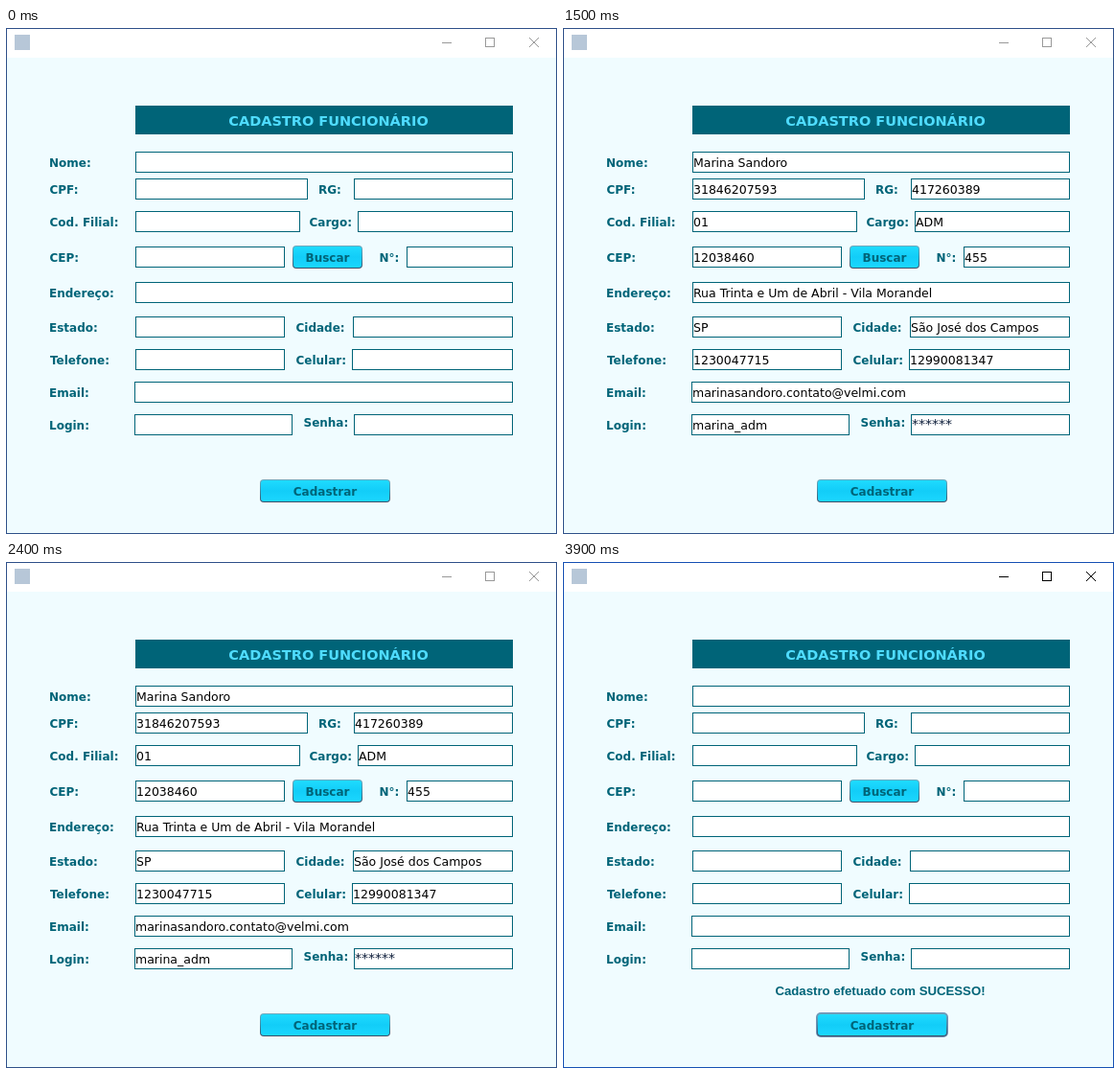
Write an HTML page with a canvas that moves like this. It is 575 px wide and 528 px high and loops after 4.5 s.

```html
<!DOCTYPE html>
<html lang="pt-BR">
<head>
<meta charset="utf-8">
<title>Cadastro</title>
<style>
  html, body { margin: 0; width: 100%; height: 100%; overflow: hidden; }
  canvas { display: block; }
</style>
</head>
<body>
<canvas id="stage" width="575" height="528"></canvas>
<script>
const ctx = document.getElementById('stage').getContext('2d');
const TEAL = '#006478';
const SANS = '"DejaVu Sans", sans-serif';
const LABEL_FONT = `bold 12px ${SANS}`;
const STEP = 1500;

// Each row: top edge, then [label, label x, field x, field width, value]
const ROWS = [
  [129, ['Nome:', 45, 135, 394, 'Marina Sandoro']],
  [157, ['CPF:', 45.5, 135, 180, '31846207593'], ['RG:', 326, 363, 166, '417260389']],
  [191, ['Cod. Filial:', 45.5, 135, 172, '01'], ['Cargo:', 316.5, 367, 162, 'ADM']],
  [228, ['CEP:', 45.5, 135, 156, '12038460'], ['N°:', 389.5, 418, 111, '455']],
  [265, ['Endereço:', 45, 135, 394, 'Rua Trinta e Um de Abril - Vila Morandel']],
  [301, ['Estado:', 45, 135, 156, 'SP'], ['Cidade:', 302.5, 362, 167, 'São José dos Campos']],
  [335, ['Telefone:', 46, 135, 156, '1230047715'], ['Celular:', 302.5, 361, 168, '12990081347']],
  [369, ['Email:', 45, 134, 395, 'marinasandoro.contato@velmi.com']],
  [403, ['Login:', 45, 134, 165, 'marina_adm'], ['Senha:', 310.5, 363, 166, '******']]
];

function rect(x, y, w, h, color) {
  ctx.fillStyle = color;
  ctx.fillRect(x, y, w, h);
}

function outline(x, y, w, h, color) {
  ctx.strokeStyle = color;
  ctx.lineWidth = 1;
  ctx.strokeRect(x + 0.5, y + 0.5, w - 1, h - 1);
}

function text(str, x, y, font, color, align = 'left') {
  ctx.font = font;
  ctx.fillStyle = color;
  ctx.textAlign = align;
  ctx.fillText(str, x, y);
}

function rounded(x, y, w, h, r, fill) {
  ctx.beginPath();
  ctx.roundRect(x, y, w, h, r);
  ctx.fillStyle = fill;
  ctx.fill();
}

function vertical(y, h, ...colors) {
  const g = ctx.createLinearGradient(0, y, 0, y + h);
  colors.forEach((c, i) => g.addColorStop(i / (colors.length - 1), c));
  return g;
}

function drawWindow(active) {
  rect(0, 0, 575, 528, '#f0fcff');
  rect(0, 0, 575, 31, '#ffffff');
  outline(0, 0, 575, 528, active ? '#1650b4' : '#2f5089');
  rect(9, 7, 16, 16, '#b7c7d8');

  const ink = active ? '#000000' : '#999999';
  rect(455, 15, 10, 1, ink);
  outline(500, 10, 10, 10, ink);
  ctx.beginPath();
  ctx.moveTo(546, 10);
  ctx.lineTo(556, 20);
  ctx.moveTo(556, 10);
  ctx.lineTo(546, 20);
  ctx.stroke();
}

function drawButton(label, x, y, w, h, baseline, focused) {
  if (focused) rounded(x - 1, y - 1, w + 2, h + 2, 5, '#6c8fb5');
  rounded(x, y, w, h, 4, vertical(y, h, '#6fa9bd', '#3a8ba6', '#3f4c63'));
  rounded(x + 1, y + 1, w - 2, h - 2, 3, vertical(y, h, '#20dcff', '#12cdf8', '#1cd8ff'));
  text(label, x + w / 2, baseline, LABEL_FONT, TEAL, 'center');
}

function drawField([label, labelX, x, w, value], y, filled) {
  const isPassword = label === 'Senha:';
  text(label, labelX, y + (isPassword ? 13 : 16), LABEL_FONT, TEAL);
  rect(x, y, w, 22, '#ffffff');
  outline(x, y, w, 22, TEAL);
  if (!filled) return;
  if (isPassword) text(value, x + 1, y + 15, `14px ${SANS}`, '#10203c');
  else text(value, x + 1, y + 16, `12.5px ${SANS}`, '#000000');
}

function draw(filled, done) {
  drawWindow(done);
  rect(135, 81, 394, 30, TEAL);
  text('CADASTRO FUNCIONÁRIO', 336.5, 102, `bold 14.5px ${SANS}`, '#4fdcff', 'center');
  for (const [y, ...fields] of ROWS) {
    for (const field of fields) drawField(field, y, filled);
  }
  drawButton('Buscar', 299, 227, 73, 24, 244, false);
  drawButton('Cadastrar', 265, 471, 136, 24, 488, done);
  if (done) {
    text('Cadastro efetuado com SUCESSO!', 331, 452,
      'bold 13.2px "Liberation Sans", Arial, sans-serif', TEAL, 'center');
  }
}

const start = performance.now();
function tick() {
  const phase = Math.floor((performance.now() - start) / STEP) % 3;
  draw(phase === 1, phase === 2);
  requestAnimationFrame(tick);
}
tick();
</script>
</body>
</html>
```
